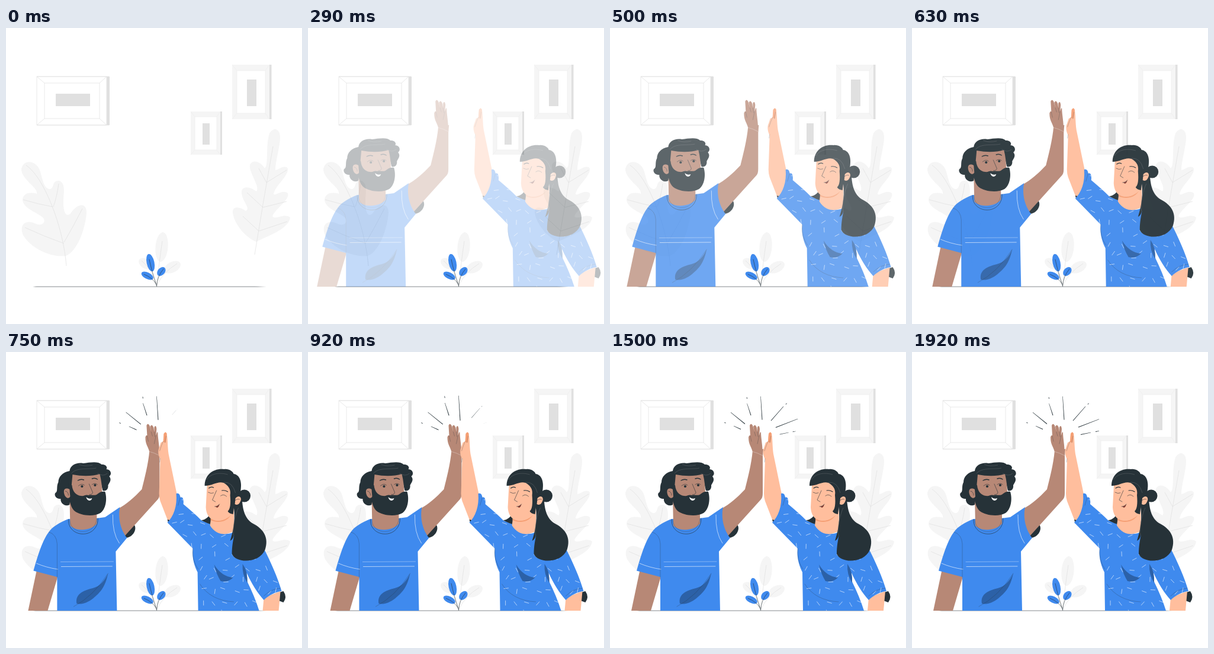
An HTML page for the animation above (1.96 s loop, 500 px wide and 500 px high).

```html
<!DOCTYPE html>
<html lang="en">
<head>
<meta charset="utf-8">
<title>High five</title>
<style>
  html, body { margin: 0; width: 100%; height: 100%; overflow: hidden; background: #fff; }
  svg { display: block; width: 100%; height: 100%; }
  .line { fill: none; stroke: #263238; stroke-width: .6; stroke-linecap: round; stroke-linejoin: round; }
  .soft { stroke-width: .5; opacity: .55; }
  .white { fill: none; stroke: #fff; stroke-width: .6; stroke-linecap: round; }
  .shine { fill: none; stroke: #62696d; stroke-width: .5; }
  .vein { fill: none; stroke: #e0e0e0; stroke-width: .7; }
  .dark { fill: #263238; }
  .blue { fill: #3f8aee; }
  .shade { fill: #2c61a7; }
  .pale { fill: #f5f5f5; }
  .grey { fill: #e0e0e0; }
  .tan { fill: #b78876; }
  .peach { fill: #ffbe9d; }
  .blush { fill: #f59f74; }
</style>
</head>
<body>
<svg viewBox="0 0 500 500">
  <defs>
    <path id="blouse" d="M289 239Q295 237 296 246C300 243 302 250 301 257C312 266 323 276 332 285C339 288 344 290 350 292C358 309 375 310 386 304L402 310L438 334C449 356 460 380 467 404C457 405 445 411 437 419C426 407 416 391 408 373L409 388C417 404 424 421 429 437H326L325 372C321 364 315 350 317 332L274 288C284 278 291 261 289 239Z"/>
    <clipPath id="blouseClip"><use href="#blouse"/></clipPath>
  </defs>

  <g id="frames">
    <path class="grey" d="M170 82H175V164H170Z"/>
    <path class="vein" fill="#fff" d="M52 82H170V164H52ZM65 93H158V153H65ZM52 82L65 93M170 82L158 93M52 164L65 153M170 164L158 153"/>
    <path class="vein" d="M52 82H174M52 164H174"/>
    <path class="grey" d="M84 111H142V132H84Z"/>
    <path class="grey" d="M444 62H448.500V154H444ZM361 141H365V214H361Z"/>
    <path class="pale" d="M382 62H445V154H382ZM312 141H362V214H312Z"/>
    <path fill="#fff" stroke="#ebebeb" stroke-width=".6" d="M390 72H438V144H390ZM319 150H356V206H319Z"/>
    <path fill="none" stroke="#ebebeb" stroke-width=".6" d="M382 62L390 72M445 62L438 72M382 154L390 144M445 154L438 144M312 141L319 150M362 141L356 150M312 214L319 206M362 214L356 206"/>
    <path class="grey" d="M407 87H423V132H407ZM332 161H344V197H332Z"/>
  </g>

  <g id="foliage">
    <path class="pale" d="M101 385C75 388 42 372 29 350C22 333 32 322 51 331C61 335 68 328 63 321C55 312 30 306 28 291C28 275 48 278 52 280C55 270 25 255 26 238C30 220 51 224 57 240C62 255 64 273 75 272C82 270 77 257 90 258C100 262 98 275 97 290C96 314 103 321 110 312C119 298 136 292 136 312C134 340 120 378 101 385Z"/>
    <path class="vein" d="M34 232C62 250 96 330 102 402M89 263Q86 285 80 302M29 290Q56 298 79 302M129 305Q115 333 98 362M32 337Q64 352 98 364"/>
    <path class="pale" d="M423 361C405 355 385 330 383 312C382 300 395 302 405 309C415 305 396 290 398 275C402 265 415 270 423 276C430 268 410 245 412 231C417 221 430 226 437 237C444 232 438 200 445 178C452 166 463 170 463 184C463 200 455 226 455 240C460 240 470 230 476 237C478 250 455 265 452 281C456 283 468 272 476 279C480 290 455 305 450 318C455 325 470 312 480 320C478 340 440 352 423 361Z"/>
    <path class="vein" d="M451 200Q435 290 420 383M427 237L440 261L474 240M407 278L434 303L474 293M400 318L427 343L475 327"/>
    <g class="pale">
      <ellipse cx="263" cy="370" rx="10.500" ry="25" transform="rotate(5 263 370)"/>
      <ellipse cx="235" cy="398" rx="12" ry="8" transform="rotate(35 235 398)"/>
      <ellipse cx="281" cy="404" rx="15" ry="9" transform="rotate(-28 281 404)"/>
    </g>
    <path class="vein" d="M264 360Q258 400 255 434M229 393Q248 410 254 432M289 398Q266 412 255 434"/>
    <path fill="#aeb1b3" d="M45 437L52 436.200H420L440 437L425 437.700H50Z"/>
    <g class="blue">
      <ellipse cx="244" cy="396.500" rx="6.500" ry="15" transform="rotate(-12 244 396)"/>
      <ellipse cx="239" cy="418.500" rx="11" ry="5.500" transform="rotate(27 239 418)"/>
      <ellipse cx="262" cy="411.500" rx="8.500" ry="6" transform="rotate(-48 262 411)"/>
    </g>
    <path class="line" d="M242 391Q246 410 254.500 436M233 416Q248 422 254 433M266 407Q255 420 254.500 436"/>
  </g>

  <g id="man">
    <path class="tan" d="M51 366L87 376L69 437H36Z"/>
    <path class="dark" d="M197 308L200 314C211 314 220 302 216 293L206 285Z"/>
    <path class="tan" d="M241 166C239 190 232 215 228 232C215 246 202 257 188 265L192 311H199L255 249Q258 246 258 238V176L259 164Z"/>
    <path class="tan" d="M241 169C239 160 234 157 234 144Q235 140 237 141L236 124Q238 119 241 124L244 135L242 126Q245 120 248 128L249 135V127Q252 122 253 130L252 141Q254 133 255 136C255 146 258 157 258 176Z"/>
    <path class="line soft" d="M237 142L239 151M244 135L246 142M249 135L250 143M252 141L249 155"/>
    <path class="white" d="M240 168Q249 170 258 175" opacity=".5"/>
    <path class="blue" d="M104 282C89 288 77 295 71 304C60 318 52 345 45 369.500L85 380V437H186L184 337L203 314C193 302 187 281 191 262L166 279L151 281Z"/>
    <path class="white" d="M50 357Q66 364 86 367M92 362.500L178 362M179 275Q178 306 190 323"/>
    <path class="white" d="M91 354.500L180 354" opacity=".6"/>
    <path class="line soft" d="M71 304Q84 308 85 324V380"/>
    <path class="shade" d="M118 425C115 409 129 403 145 399C157 396 165 387 171 374C166 398 157 407 146 416C136 424 126 427 118 425Z"/>
    <path class="line soft" d="M113 430Q146 413 171 374"/>
    <path class="tan" d="M106 245L107 293C115 303 141 303 152 290L152 265Z"/>
    <path class="line" d="M104 283C103 315 154 317 154 281"/>
    <path class="line soft" d="M106 284C108 310 150 311 152 281"/>
    <path class="dark" d="M106 201C107 191 118 186 129 188C140 187 154 184 160 190C167 189 171 195 168 198C176 198 178 207 173 210C178 216 173 221 171 225C172 232 167 236 162 234L157 213L112 212L106 258C98 262 90 255 91 248C84 249 79 242 82 238C87 236 83 227 87 220C87 211 94 203 106 201Z"/>
    <path class="tan" d="M111 207Q137 212 157 206Q161 222 161 240C159 262 111 264 108 240Z"/>
    <path class="dark" d="M104 222L110 225C111 236 117 242 125 243C131 244 133 240 138 242C143 240 148 244 153 240C157 236 162 235 166 236C170 249 167 266 158 272C146 279 124 276 115 269C106 262 104 243 104 222Z"/>
    <path class="tan" d="M106 232C98 228 95 233 97 240C99 247 105 249 107 244Z"/>
    <path class="line" d="M99 235Q104 236 104 242M139 223L145 237Q145 241 139 241" stroke-width=".8"/>
    <path class="line" d="M120 217Q125 214 130 216M144 214Q149 212 153 215" style="stroke-width:1.4"/>
    <circle class="dark" cx="127" cy="227" r="2.100"/><circle class="dark" cx="149" cy="225" r="2.100"/>
    <path class="line" d="M121 226Q127 221 131 225M144 224Q149 220 153 224"/>
    <path fill="#fff" d="M134 245Q138 249 144 247Q143 251 139 251Q135 250 134 245Z"/>
    <path class="shine" d="M109 205C119 194 138 199 151 196M122 190Q132 194 145 191M153 205Q163 211 170 205"/>
  </g>

  <g id="woman">
    <path class="dark" d="M463 406L470 404Q477 414 470 423L462 420Z"/>
    <path class="peach" d="M437 415L465 404L462 437H435Z"/>
    <path class="dark" d="M331 284C340 284 344 276 348 273L357 294Q341 291 331 284Z"/>
    <path class="peach" d="M262 181C258 174 258 166 260 162L263 153L267 151L268 138Q271 133 273 138C275 148 274 165 277 177L290 240L292 262L276 288L262 252Q260 246 260 239Z"/>
    <path class="blush" d="M268 138Q271 133 273 138L271 153L267 152Z"/>
    <path class="line soft" d="M267 151L264 158L261 167M272 142L270 153M262 180L261 186"/>
    <path class="dark" d="M274 283L276 290L282 285Z"/>
    <use href="#blouse" class="blue"/>
    <g id="stitches" clip-path="url(#blouseClip)"></g>
    <path class="peach" d="M349 270L346 293C358 312 376 309 387 302L386 252Z"/>
    <path class="blush" d="M347 280C357 288 371 285 381 276C374 287 359 290 347 284Z"/>
    <path class="shade" d="M353 359Q365 379 385 381Q376 390 364 387Q357 376 353 359ZM401 358Q410 370 409 390Q400 376 401 358Z"/>
    <path class="line soft" d="M317 332Q315 351 326 367M329 392Q347 420 386 422M437 412Q449 400 465 399M296 245L292 259"/>
    <path class="dark" d="M384 250C391 280 385 303 380 319Q386 317 388 303C385 318 383 328 383 341C389 357 429 358 439 334C446 313 436 299 419 290C405 282 401 267 400 246Z"/>
    <circle class="dark" cx="404" cy="243" r="10.500"/>
    <path class="peach" d="M341 224L339 262C340 284 355 287 367 284C380 281 389 265 388 230L364 218Z"/>
    <path class="dark" d="M337 226C337 207 352 196 370 198C378 197 385 202 386 206C396 207 400 219 398 232L396 246L388 250L385 274Q378 273 376 269Q382 264 380 242C382 231 376 225 369 221C358 218 351 226 337 226Z"/>
    <path class="peach" d="M389 247C395 240 401 246 397 253Q394 260 388 257Z"/>
    <path class="line" d="M388 251Q393 247 396 249M343 237Q348 240 352 238M364 243Q369 239 374 244M357 234L350 250L355 253" stroke-width=".8"/>
    <path class="line" d="M344 230Q348 227 352 229M366 234Q371 233 376 236" style="stroke-width:1.2"/>
    <path fill="#80372e" d="M355 261Q359 261 362 257Q361 262 358 263Z"/>
    <path class="line" d="M354 261Q359 261 362 257"/>
    <path class="shine" d="M340 216C347 205 362 203 376 207M369 220Q384 219 389 238M386 310C384 296 388 276 394 263"/>
  </g>

  <g id="sparks" class="dark"></g>
</svg>

<script>
const SVG_NS = "http://www.w3.org/2000/svg";
const LOOP = 1960, FPS = 24, HOLD = 130, HOLD_FRAMES = 3, SLIDE = 30;
const byId = id => document.getElementById(id);

function addPath(parent, attrs) {
  const path = document.createElementNS(SVG_NS, "path");
  for (const key in attrs) path.setAttribute(key, attrs[key]);
  return parent.appendChild(path);
}

// Scatter short stitches over the blouse on a jittered grid.
let seed = 11;
const random = () => (seed = seed * 16807 % 2147483647) / 2147483647;
let stitches = "";
for (let y = 246; y < 438; y += 19) {
  for (let x = 276; x < 468; x += 18) {
    const angle = random() * Math.PI;
    const dx = 3.8 * Math.cos(angle), dy = 3.8 * Math.sin(angle);
    const cx = x + random() * 10, cy = y + random() * 10;
    stitches += `M${cx - dx} ${cy - dy}L${cx + dx} ${cy + dy}`;
  }
}
addPath(byId("stitches"), { d: stitches, class: "white" });

// A thin wedge, narrower at its first end.
function wedge(x1, y1, x2, y2, width) {
  const length = Math.hypot(x2 - x1, y2 - y1);
  const nx = (y2 - y1) / length * width / 2, ny = (x1 - x2) / length * width / 2;
  return `M${x1 - nx * .5} ${y1 - ny * .5}L${x1 + nx * .5} ${y1 + ny * .5}` +
    `L${x2 + nx} ${y2 + ny}L${x2 - nx} ${y2 - ny}Z`;
}

const sparks = [
  { start: 0, origin: [233, 108], lines: [[193, 119, 195.5, 120], [209, 125, 221, 130.5], [204, 102, 228, 121.5]] },
  { start: .04, origin: [236, 103], lines: [[231, 76, 231.5, 79], [231.5, 87, 238, 107]] },
  { start: .05, origin: [256, 95], lines: [[254.5, 75, 257, 114.5]] },
  { start: .45, origin: [285, 101], lines: [[293, 92, 272, 116], [298.5, 86.5, 297, 88.5]] },
  { start: .7, origin: [299, 120], lines: [[316, 113.5, 281, 127]] },
  { start: .92, origin: [299, 136.5], lines: [[302, 136, 285, 139.5], [316, 133.5, 310, 134.5]] }
];
for (const spark of sparks) {
  spark.node = addPath(byId("sparks"), {
    d: spark.lines.map(line => wedge(...line, 1)).join("")
  });
}

const bezier = (a, b, s) => 3 * (1 - s) ** 2 * s * a + 3 * (1 - s) * s * s * b + s ** 3;

// Ease with a slight overshoot before settling.
function ease(x) {
  if (x <= 0) return 0;
  if (x >= 1) return 1;
  let low = 0, high = 1;
  for (let i = 0; i < 24; i++) {
    const mid = (low + high) / 2;
    if (bezier(.36, .5, mid) < x) low = mid; else high = mid;
  }
  return bezier(-.01, 1.38, low);
}

function show(node, amount, transform) {
  node.setAttribute("opacity", Math.max(0, Math.min(1, amount)));
  node.setAttribute("transform", transform);
}

function render(ms) {
  const step = Math.floor((ms - HOLD + 9.9) * FPS / 1000);
  const time = ms < HOLD ? 0 : (step + HOLD_FRAMES) / FPS;
  const arrival = ease(time);
  const offset = SLIDE * (1 - arrival);
  show(byId("man"), arrival, `translate(${-offset})`);
  show(byId("woman"), arrival, `translate(${offset})`);
  for (const { start, origin: [x, y], node } of sparks) {
    const size = ease(time - start);
    show(node, size, `translate(${x} ${y}) scale(${Math.max(0, size)}) translate(${-x} ${-y})`);
  }
}

const begin = performance.now();
function tick() {
  render((performance.now() - begin) % LOOP);
  requestAnimationFrame(tick);
}
tick();
</script>
</body>
</html>
```
